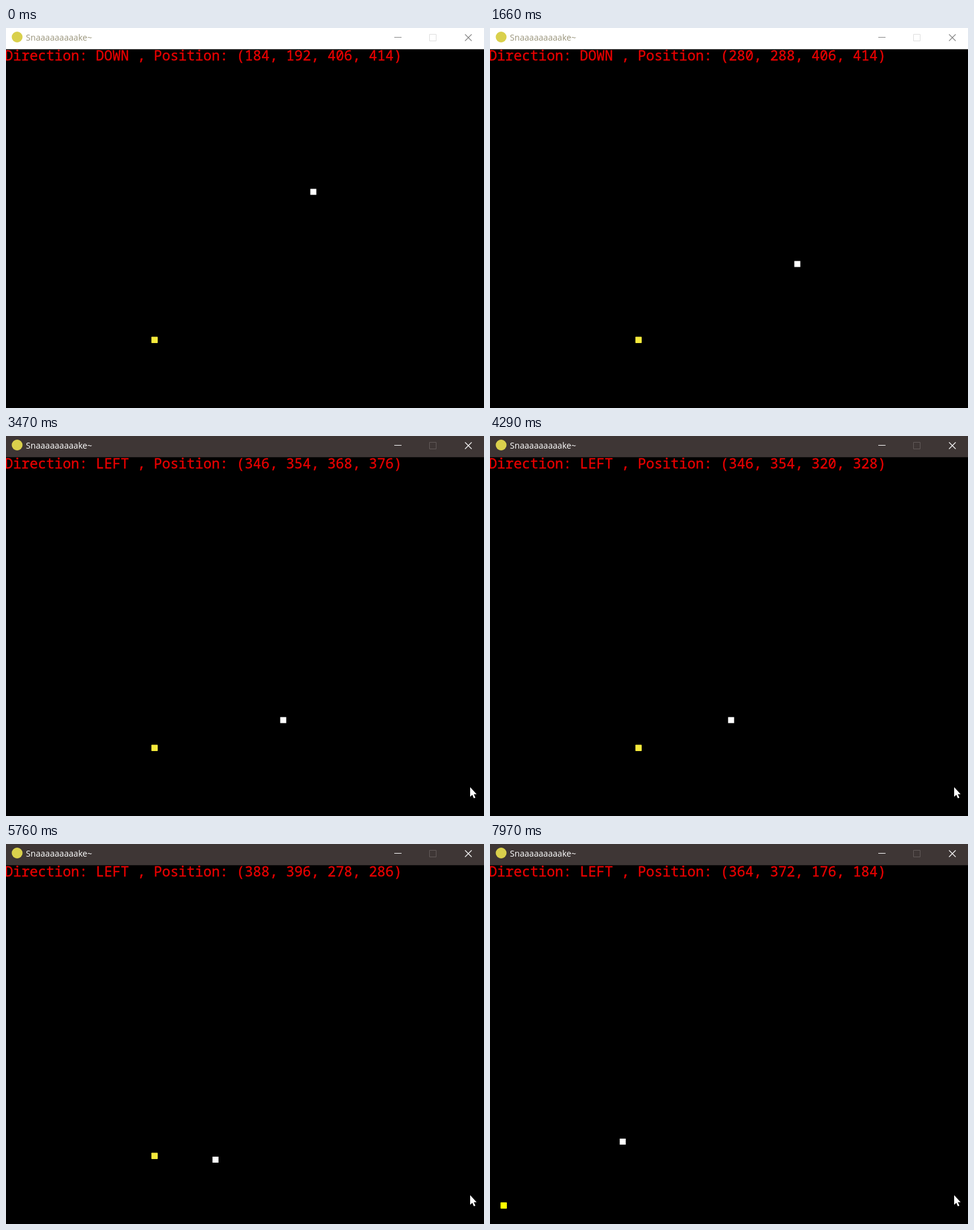
An HTML page for the animation above (8 s loop, 794x632 px).

```html
<!DOCTYPE html>
<html lang="en">
<head>
<meta charset="utf-8">
<title>Snake</title>
<style>
  html, body { margin: 0; height: 100%; overflow: hidden; background: #000; }
  svg { display: block; width: 100vw; height: 100vh; }
  #bar { --bar: #fff; --ink: #9a957c; --line: #858585; --faint: #dedede; }
  #bar.active { --bar: #3e3635; --ink: #fff; --line: #fff; --faint: #625a59; }
  #bar .back { fill: var(--bar); }
  #bar text { font: 14.1px "Open Sans", sans-serif; fill: var(--ink); }
  #bar path { fill: none; stroke: var(--line); }
  #bar .faint { stroke: var(--faint); }
  #status {
    font: 22.917px "Noto Sans Mono", monospace; white-space: pre;
    fill: #e60000; stroke: #e60000; stroke-width: .4;
  }
</style>
</head>
<body>
<svg viewBox="0 0 794 632">
  <rect width="794" height="632"/>
  <g id="bar">
    <rect class="back" width="794" height="35.3"/>
    <circle cx="18.5" cy="15" r="9" fill="#d9d04c"/>
    <text x="33" y="21">Snaaaaaaaaake~</text>
    <path d="M645 15.5h12"/>
    <path class="faint" d="M703.5 10.5h11v11h-11z"/>
    <path d="M762.5 10.5l11 11m0-11l-11 11" stroke-width="1.2"/>
  </g>
  <text id="status" x="-2" y="54"></text>
  <rect id="food" width="10.5" height="10.5" rx=".8"/>
  <rect id="head" width="10" height="10" fill="#fff"/>
  <path id="cursor" d="M0 0v16l3.6-3.3 2.5 5.8 2.6-1.1-2.6-5.7h4.6z" fill="#fff"/>
</svg>
<script>
const LOOP = 8000;
const GROUP = 12;
// Start times of successive groups of twelve pictures
const starts = [70, 890, 1730, 2560, 3400, 4220, 5060, 5900, 6730, 7560, 8380];
const legs = [['DOWN', 81], ['LEFT', 50], ['DOWN', 21], ['LEFT', 58], ['UP', 12], ['LEFT', 8]];
const moves = { DOWN: [0, 2], LEFT: [-2, 0], UP: [0, -2] };
const CELL = 8, SCALE = 1.25;
const ACTIVE = 31, CURSOR_IN = 28, SKIPPED = 98, EATEN = 106;

const [bar, status, food, head, cursor] =
  ['bar', 'status', 'food', 'head', 'cursor'].map(id => document.getElementById(id));

function stepAt(t) {
  if (t < starts[0]) return 0;
  const g = starts.findLastIndex(s => s <= t);
  const length = (starts[g + 1] - starts[g]) / GROUP;
  return 1 + g * GROUP + Math.min(GROUP - 1, Math.floor((t + 2 - starts[g]) / length));
}

function walk(ticks) {
  let x = 406, y = 184, dir = 'DOWN';
  for (const [name, count] of legs) {
    if (ticks <= 0) break;
    const n = Math.min(ticks, count);
    dir = name;
    x += moves[name][0] * n;
    y += moves[name][1] * n;
    ticks -= n;
  }
  return { x, y, dir };
}

function place(el, x, y) {
  el.setAttribute('transform', `translate(${x} ${y})`);
}

function draw(t) {
  const step = stepAt(t);
  const ticks = 2 * step + 1 - (step >= SKIPPED);
  const now = walk(ticks), before = walk(ticks - 1);
  place(head, now.x * SCALE - 2, now.y * SCALE + 35);

  const spot = [before.y, before.y + CELL, before.x, before.x + CELL].join(', ');
  status.textContent = `Direction: ${now.dir.padEnd(4)} , Position: (${spot})`;

  const eaten = step >= EATEN;
  place(food, eaten ? 17.5 : 241.5, eaten ? 596 : 513.5);
  food.setAttribute('fill', eaten ? '#ff0' : '#f6ea3c');

  bar.classList.toggle('active', step >= ACTIVE);
  const away = Math.max(0, 1 - (step - CURSOR_IN) / 3);
  place(cursor, 771 + 14 * away, 584 + 36 * away);
  cursor.style.display = step < CURSOR_IN ? 'none' : '';
}

const begin = performance.now();
function tick() {
  draw((performance.now() - begin) % LOOP);
  requestAnimationFrame(tick);
}
tick();
</script>
</body>
</html>
```
